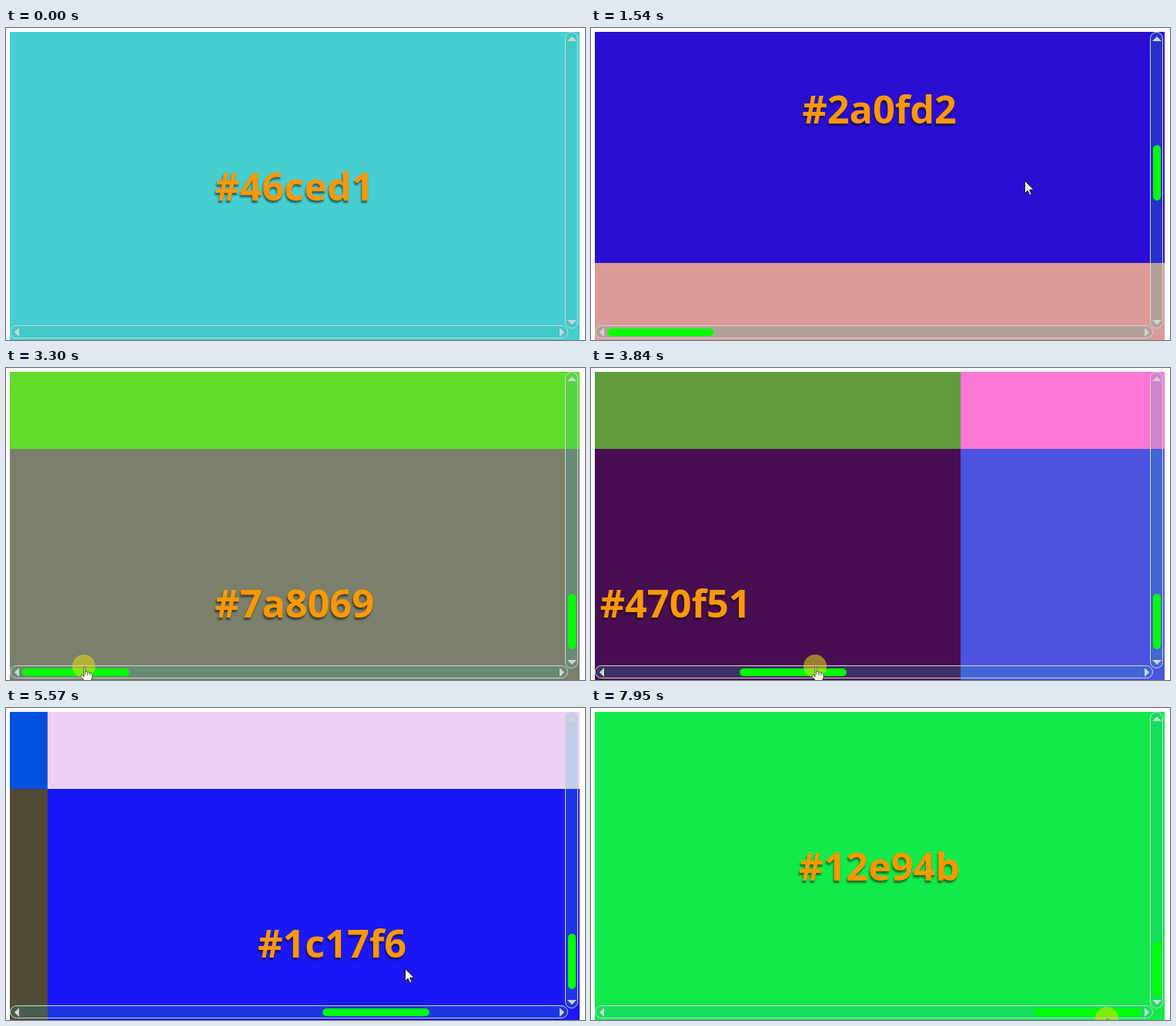
An HTML page for the animation above (8 s loop, 752 px wide and 405 px high).

```html
<!DOCTYPE html>
<html lang="en">
<head>
<meta charset="utf-8">
<title>Colour grid with custom scrollbars</title>
<style>
  html, body { margin: 0; width: 100%; height: 100%; overflow: hidden; background: #fff; }
  svg { display: block; }
  .label {
    font: 700 50.4px "Open Sans", "Noto Sans", sans-serif;
    fill: #ff9800;
    text-anchor: middle;
    filter: drop-shadow(-.5px 3px 1.2px rgba(0, 0, 0, .5));
  }
  .track { fill: rgba(32, 178, 170, .2); stroke: #d3d3d3; }
  .arrow { fill: #d3d3d3; }
  .thumb { fill: #0f0; }
</style>
</head>
<body>
<svg width="752" height="405" viewBox="0 0 752 405">
  <svg x="5" y="5" width="740" height="400" overflow="hidden">
    <g id="grid"></g>
  </svg>
  <rect class="track" x="726.5" y="5.5" width="16" height="384" rx="8"/>
  <rect class="track" x="5.5" y="386.5" width="724" height="16" rx="8"/>
  <path class="arrow" d="M735 11l6 6h-12zM735 385l6-6h-12zM11 395l6-6v12zM725 395l-6-6v12z"/>
  <g id="thumbs">
    <rect id="thumbX" class="thumb" y="390" width="139" height="10" rx="5"/>
    <rect id="thumbY" class="thumb" x="730" width="10" height="72" rx="5"/>
  </g>
  <g id="cursor">
    <circle id="press" r="15" fill="#e6dc14" fill-opacity=".55"/>
    <path id="arrow" fill="#fff" stroke="#222"
      d="M.5.5V16.5L4 13 7 19 9 18 6.5 12H12z"/>
    <g id="hand" stroke="#333" stroke-width=".8" stroke-linejoin="round">
      <path fill="#ffffe8" d="M0 1q1-2 2 0v6q2-1 3 1q2-1 3 1q2-1 3 1v5l-2 4v3h-8v-3l-5-6q0-3 3-1l1 2z"/>
      <path fill="none" d="M2 7v4M5 8v4M8 9v3"/>
    </g>
  </g>
</svg>
<script>
const NS = "http://www.w3.org/2000/svg";
const $ = id => document.getElementById(id);
const LOOP = 8000, FPS = 13, W = 740, H = 400, LAST = 7;
const MAX_X = W * LAST, MAX_Y = H * LAST, THUMB_LAG = 22;

// Cells on the route through the grid; "-" gets a random colour.
const columnTop = "46ced1 - d3db8c 2a0fd2 - -";
const bottomRows = [
  "62dd2b - 609c3e ff78d5 0050e0 edd0f8 53ba62 847e4a",
  "7a8069 - 470f51 4b53df 514a37 1c17f6 4f228a 12e94b"
];

let seed = 7;
function randomHex() {
  seed = seed * 16807 % 2147483647;
  return (seed & 0xffffff).toString(16).padStart(6, "0");
}

function add(tag, attrs, text = "") {
  const el = document.createElementNS(NS, tag);
  for (const key in attrs) el.setAttribute(key, attrs[key]);
  el.textContent = text;
  $("grid").append(el);
}

function addCell(col, row, code) {
  const x = col * W, y = row * H;
  const color = "#" + (code === "-" ? randomHex() : code);
  add("rect", { x, y, width: W, height: H, fill: color });
  add("text", { x: x + W / 2 - .5, y: y + 219, class: "label" }, color);
}

columnTop.split(" ").forEach((code, row) => addCell(0, row, code));
bottomRows.forEach((codes, i) =>
  codes.split(" ").forEach((code, col) => addCell(col, LAST - 1 + i, code)));

// A track is a first value and its eased moves: [start, end, new value].
const wheel = { from: 0, moves: [[330, 1399, 1300], [1540, 2110, 2700], [5670, 5825, MAX_Y]] };
const drag = { from: 0, moves: [[3385.4, 4552.6, MAX_X], [4800, 5500, 3651], [6940, 7880, MAX_X]] };
const pointerX = { from: 462, moves: [[2680, 2990, 0], [5400, 5550, 20], [6400, 6700, 4]] };
const pointerY = {
  from: 198,
  moves: [[2100, 2680, 425], [2690, 2990, 387], [3850, 4290, 360],
    [4600, 5500, 338], [5980, 6230, 393], [6940, 7800, 403]]
};
// Spans in which the scrollbar thumbs are awake.
const awake = [[230, 2380], [3150, 6400], [6870, LOOP]];

const clamp = u => Math.min(1, Math.max(0, u));
const ease = u => u * u * (3 - 2 * u);
const within = (t, a, b) => t >= a && t < b;

function at(track, t) {
  return track.moves.reduce(
    (v, [a, b, to]) => v + (to - v) * ease(clamp((t - a) / (b - a))), track.from);
}

const wakeLevel = t =>
  Math.max(...awake.map(([a, b]) => clamp((t - a) / 70) * clamp(1 - (t - b) / 310)));

const show = (id, on) => $(id).setAttribute("display", on ? "inline" : "none");
const move = (id, x, y) => $(id).setAttribute("transform", `translate(${x} ${y})`);

function draw(t) {
  const x = at(drag, t), y = at(wheel, t), lagged = t - THUMB_LAG;
  move("grid", -Math.round(x), -Math.round(y));

  $("thumbX").setAttribute("x", Math.round(21 + at(drag, lagged) / MAX_X * 554));
  $("thumbY").setAttribute("y", Math.round(21 + at(wheel, lagged) / MAX_Y * 282));
  $("thumbs").setAttribute("opacity", wakeLevel(t));

  const dragging = within(t, 3220, 5500) || t >= 6940;
  const hand = within(t, 2900, 5500) || t >= 6200;
  // The pointer follows the dragged thumb, plus its own free movement.
  move("cursor", Math.round(100.5 + x / 9.16 + at(pointerX, t)), Math.round(at(pointerY, t)));
  show("cursor", within(t, 300, 2100) || t >= 2680);
  show("press", dragging);
  show("hand", hand);
  show("arrow", !hand);
}

// The picture advances at a fixed frame rate, rounded to 10 ms.
function snap(t) {
  const n = Math.floor((t + 9.99) * FPS / 1000);
  return Math.floor(n * 100 / FPS) * 10;
}

const start = performance.now();
function tick() {
  draw(snap((performance.now() - start) % LOOP));
  requestAnimationFrame(tick);
}
tick();
</script>
</body>
</html>
```
